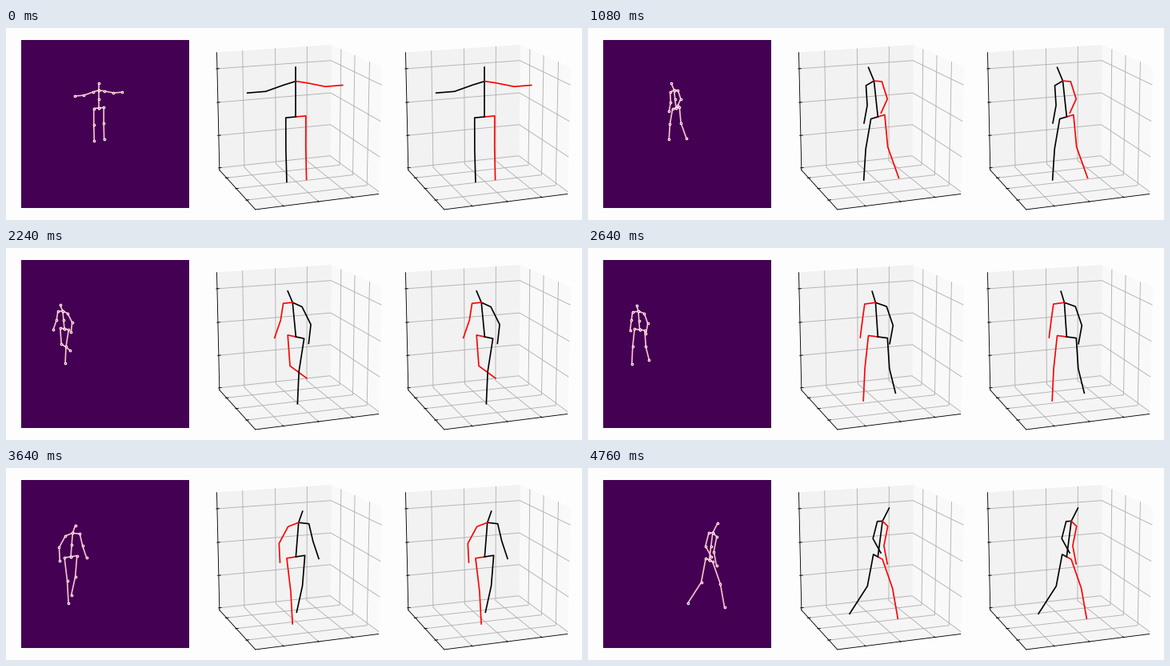
Recreate the animation shown at these times as a matplotlib script. Size 720 px wide and 240 px high, loop 4800 ms.

```python
import numpy as np
import matplotlib.pyplot as plt
from matplotlib.animation import FuncAnimation
from matplotlib.patches import Polygon, Rectangle

W, H, DPI = 720, 240, 80
FRAMES, INTERVAL = 120, 40
PANEL_GAP = 236

# Perspective camera around a unit cube centred on the origin
ELEV, AZIM, DIST = np.radians(15), np.radians(70), 7.5
SIZE, LEFT, BOTTOM = 210, 254.5, 225
TOWARD = np.array([np.cos(ELEV) * np.cos(AZIM),
                   np.cos(ELEV) * np.sin(AZIM), np.sin(ELEV)])
RIGHT = np.array([-np.sin(AZIM), np.cos(AZIM), 0])
NEAR = np.array([np.cos(AZIM), np.sin(AZIM), 0])
UP = np.array([0, 0, 1])
VIEW_UP = np.cross(TOWARD, RIGHT)

# Body lengths as parts of the cube
PELVIS = np.array([0, 0, 0.042])
TORSO, HEAD, SHOULDER, SHOULDER_DROP = 0.30, 0.12, 0.10, 0.022
UPPER_ARM, FOREARM = 0.165, 0.155
HIP, THIGH, SHIN = 0.088, 0.275, 0.275

# The walk: frame, pelvis x and y in the input panel, heading, stride.
# Heading 0 faces the camera, 90 faces right.
PATH = np.array([
    [0, 116, 100, -160, 0],
    [15, 117.5, 100, -155, 0.2],
    [39, 97, 100, -95, 1],
    [56, 73, 101, -40, 1],
    [76, 63, 104, -15, 0.4],
    [105, 112, 116, 80, 1],
    [119, 151.5, 115, 115, 1],
])
GAIT_FRAMES, GAIT_START = 26.4, 39
ARMS_DOWN = 28

SIDES = ((1, "red"), (-1, "black"))
COLORS = ["red", "black", "black", "black", "red"]


def project(points):
    p = np.asarray(points, float)
    depth = DIST - p @ TOWARD
    x = (p @ RIGHT / depth + 0.095) / 0.185
    y = (p @ VIEW_UP / depth + 0.095) / 0.185
    return np.column_stack([LEFT + SIZE * x, BOTTOM - SIZE * y])


def smooth(t, values, n):
    """Cubic Hermite curve through the values, read at n."""
    slope = np.gradient(values, t, axis=0)
    i = min(np.searchsorted(t, n, side="right") - 1, len(t) - 2)
    span = t[i + 1] - t[i]
    u = (n - t[i]) / span
    return ((2 * u**3 - 3 * u**2 + 1) * values[i]
            + (u**3 - 2 * u**2 + u) * span * slope[i]
            + (3 * u**2 - 2 * u**3) * values[i + 1]
            + (u**3 - u**2) * span * slope[i + 1])


def limb(start, forward, out, *bones):
    """Chain of bones, each with length, forward swing and outward splay."""
    points = [start]
    for length, swing, splay in bones:
        a, s = np.radians([swing, splay])
        down = np.sin(a) * forward - np.cos(a) * UP
        points.append(points[-1] + length * (np.sin(s) * out + np.cos(s) * down))
    return points


def body(n, heading, stride):
    """Both legs, the trunk and both arms as chains of four joints."""
    turn = np.radians(heading)
    forward = np.sin(turn) * RIGHT + np.cos(turn) * NEAR
    right = -np.cos(turn) * RIGHT + np.sin(turn) * NEAR
    walk = 0.5 - 0.5 * np.cos(np.pi * min(n / ARMS_DOWN, 1))
    rise = 1 - walk

    def lean(length, angle):
        a = np.radians(angle * walk)
        return length * (np.sin(a) * forward + np.cos(a) * UP)

    neck = PELVIS + lean(TORSO, 8)
    trunk = [PELVIS, (PELVIS + neck) / 2, neck, neck + lean(HEAD, 30)]

    legs, arms = [], []
    for side, _ in SIDES:
        out = side * right
        phase = side * np.pi / 2 + 2 * np.pi * (n - GAIT_START) / GAIT_FRAMES
        step = np.sin(phase)
        lift = max(0, np.cos(phase + np.radians(20))) ** 2

        thigh = stride * (4 + 16 * step)
        bend = 4 + stride * (8 - 3 * step + 38 * lift)
        legs.append([PELVIS] + limb(
            PELVIS + HIP * out, forward, out,
            (THIGH, thigh, 0), (SHIN, thigh - bend, 0)))

        upper = walk * (-14 - 8 * step)
        lower = walk * (20 - 10 * step)
        arms.append([neck] + limb(
            neck + SHOULDER * out - SHOULDER_DROP * UP, forward, out,
            (UPPER_ARM, upper, 18 + 57 * rise), (FOREARM, lower, 3 + 87 * rise)))
    return [legs[0], legs[1], trunk, arms[1], arms[0]]


def draw_room(ax, shift):
    e = 0.5 + 1 / 48
    tick_out, tick_in = e + 0.1 / 12, e - 0.2 / 12

    def place(points):
        return project(points) + [shift, 0]

    def line(points, color):
        ax.plot(*place(points).T, color=color, lw=0.8)

    walls = [
        ([(-e, -e, -e), (-e, e, -e), (-e, e, e), (-e, -e, e)], 0.975),
        ([(-e, -e, -e), (e, -e, -e), (e, -e, e), (-e, -e, e)], 0.95),
        ([(-e, -e, -e), (e, -e, -e), (e, e, -e), (-e, e, -e)], 0.9625),
    ]
    for corners, grey in walls:
        ax.add_patch(Polygon(place(corners), fc=str(grey), ec=str(grey), lw=0.5))

    sides = np.array([-0.5, 0, 0.5]) / 1.7
    heights = np.array([0, 0.5, 1, 1.5]) / 1.7 - 0.5
    grid = "#b0b0b0"
    for s in sides:
        line([(s, e, -e), (s, -e, -e), (s, -e, e)], grid)
        line([(e, s, -e), (-e, s, -e), (-e, s, e)], grid)
    for z in heights:
        line([(e, -e, z), (-e, -e, z), (-e, e, z)], grid)

    line([(e, e, -e), (-e, e, -e)], "black")
    line([(e, -e, -e), (e, e, -e)], "black")
    line([(e, -e, -e), (e, -e, e)], "black")
    for s in sides:
        line([(s, tick_out, -e), (s, tick_in, -e)], "black")
        line([(tick_out, s, -e), (tick_in, s, -e)], "black")
    for z in heights:
        line([(tick_out, -e, z), (tick_in, -e, z)], "black")


def add_skeleton(ax, colors):
    return [ax.plot([], [], color=c, lw=1.5, zorder=5)[0] for c in colors]


def set_skeleton(lines, chains):
    for line, chain in zip(lines, chains):
        line.set_data(*chain.T)


fig = plt.figure(figsize=(W / DPI, H / DPI), dpi=DPI, facecolor="#fdfdfd")
ax = fig.add_axes([0, 0, 1, 1])
ax.axis("off")

ax.add_patch(Rectangle((19, 15), SIZE, SIZE, fc="#440154", lw=0))
for shift in (0, PANEL_GAP):
    draw_room(ax, shift)
ax.set_xlim(0, W)
ax.set_ylim(H, 0)

flat_lines = add_skeleton(ax, ["pink"] * len(COLORS))
view_lines = add_skeleton(ax, COLORS)
truth_lines = add_skeleton(ax, COLORS)
dots = ax.scatter([], [], s=5, color="red", edgecolors="white",
                  linewidths=1, zorder=10)


def update(n=0):
    x, y, heading, stride = smooth(PATH[:, 0], PATH[:, 1:], n)
    view = [project(chain) for chain in body(n, heading, stride)]
    # Nearer figures stand lower and look larger
    scale = 0.5 + 0.0175 * (y - 100)
    root = view[0][0]
    flat = [[x, y] + scale * (chain - root) for chain in view]

    set_skeleton(flat_lines, flat)
    set_skeleton(view_lines, view)
    set_skeleton(truth_lines, [chain + [PANEL_GAP, 0] for chain in view])
    dots.set_offsets(np.vstack(flat))
    return [*flat_lines, *view_lines, *truth_lines, dots]


anim = FuncAnimation(fig, update, frames=FRAMES, init_func=update,
                     interval=INTERVAL, repeat=True, repeat_delay=0, blit=False)
plt.show()
```
